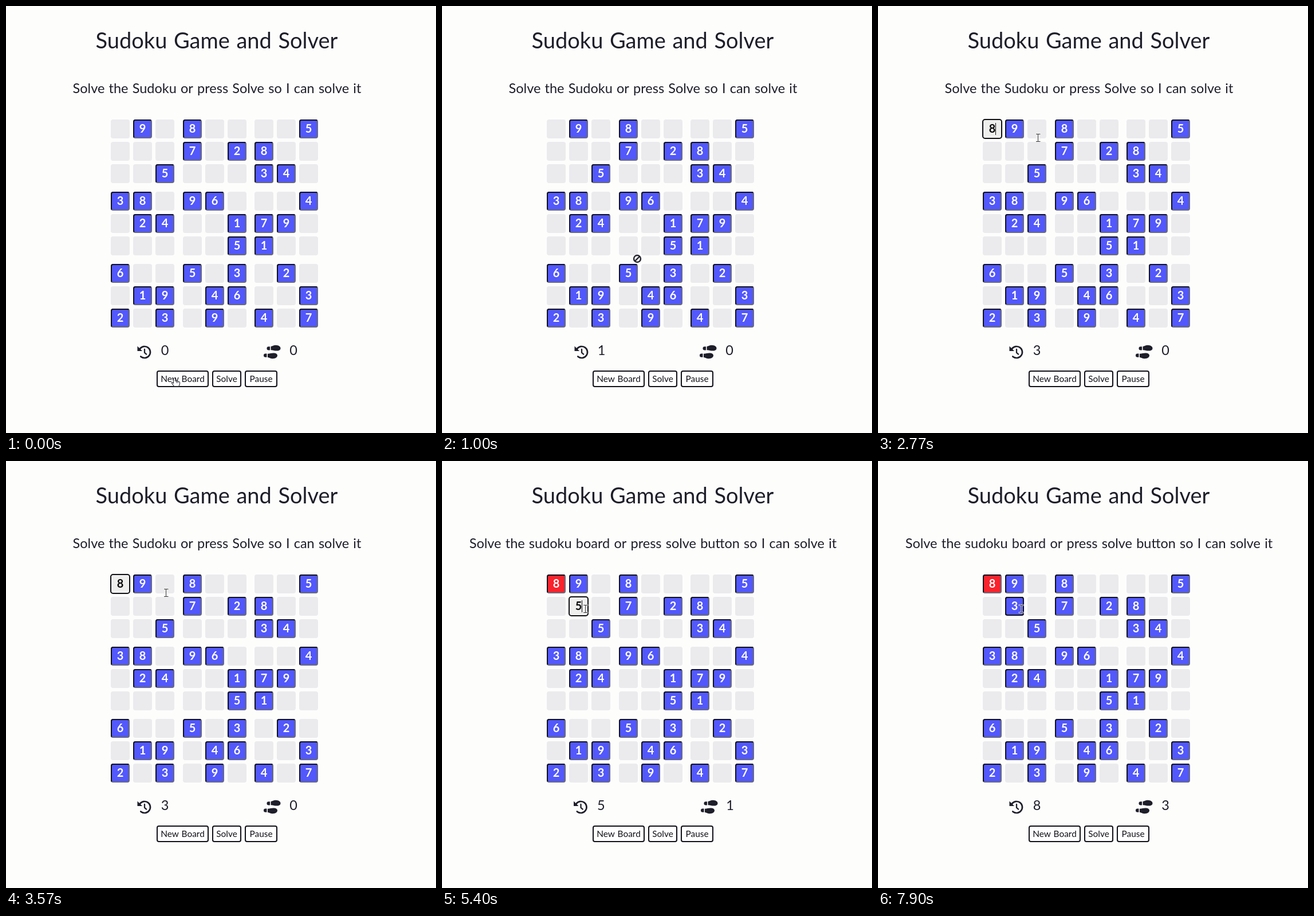
An HTML page with a canvas for the animation above (8000 ms loop, 751 px wide and 745 px high).

```html
<!DOCTYPE html>
<html lang="en">
<head>
<meta charset="utf-8">
<title>Sudoku Game and Solver</title>
<style>
  html, body { margin: 0; width: 100%; height: 100%; overflow: hidden; background: #fdfdfc; }
  canvas { display: block; }
</style>
</head>
<body>
<canvas id="stage" width="751" height="745"></canvas>
<script>
const ctx = document.getElementById('stage').getContext('2d');
const LOOP = 8000;
const INK = '#1e1e2a', BLUE = '#5258fb', RED = '#f9232d', EMPTY = '#ebebee', PAGE = '#fdfdfc';
const BOARD = [
  '.9.8....5', '...7.28..', '..5...34.',
  '38.96...4', '.24..179.', '.....51..',
  '6..5.3.2.', '.19.46..3', '2.3.9.4.7'
];
const INTRO = 'Solve the Sudoku or press Solve so I can solve it';
const PROMPT = 'Solve the sudoku board or press solve button so I can solve it';
const RETRY = 'Try again!';

// Each track lists [start time, value]; the latest started value holds.
const message = [[0, INTRO], [3640, RETRY], [4640, PROMPT], [5940, RETRY], [6960, PROMPT]];
const steps = [[0, 0], [3640, 1], [5940, 2], [7300, 3]];
const focus = [[0, null], [1800, [0, 0]], [3640, null], [4140, [1, 1]]];
const typedA = [[0, ['', EMPTY]], [2600, ['8', EMPTY]], [3640, ['8', RED]]];
const typedB = [[0, ['', EMPTY]], [5150, ['5', EMPTY]], [5940, ['5', RED]],
  [6250, ['', RED]], [6500, ['3', RED]], [7300, ['3', BLUE]]];
const caretOn = [[0, 0], [1800, 1800], [2600, 2600], [4140, 4140], [5150, 5150],
  [5940, 5940], [6500, 6500]];
const cursor = [[0, 'hand'], [520, 'arrow'], [760, 'blocked'], [1450, 'beam']];
const path = [
  [0, 296, 656], [420, 296, 656], [1000, 341, 441], [1150, 335, 420], [1700, 204, 217],
  [2350, 204, 217], [2700, 279, 230], [3650, 279, 230], [4050, 245, 257],
  [4400, 245, 257], [4900, 250, 258], [LOOP, 250, 258]
];

const at = (track, t) => track.filter(([start]) => start <= t).pop()[1];

function pointAt(t) {
  const i = Math.max(1, path.findIndex(p => p[0] > t));
  const [t0, x0, y0] = path[i - 1], [t1, x1, y1] = path[i];
  const u = (t - t0) / (t1 - t0), k = u * u * (3 - 2 * u);
  return [x0 + (x1 - x0) * k, y0 + (y1 - y0) * k];
}

function text(str, x, y, size, color = INK, weight = 400) {
  ctx.font = `${weight} ${size}px Lato, sans-serif`;
  ctx.wordSpacing = size * 0.05 + 'px';
  ctx.textAlign = 'center';
  ctx.fillStyle = color;
  ctx.fillText(str, x, y);
}

function box(x, y, w, h, r, fill, stroke, line = 2) {
  ctx.beginPath();
  ctx.roundRect(x, y, w, h, r);
  if (fill) { ctx.fillStyle = fill; ctx.fill(); }
  if (stroke) { ctx.strokeStyle = stroke; ctx.lineWidth = line; ctx.stroke(); }
}

function polygon(points, fill) {
  ctx.beginPath();
  points.forEach(p => ctx.lineTo(...p));
  ctx.closePath();
  ctx.fillStyle = fill;
  ctx.fill();
}

function line(points, color, width) {
  ctx.beginPath();
  points.forEach(p => ctx.lineTo(...p));
  ctx.strokeStyle = color;
  ctx.lineWidth = width;
  ctx.stroke();
}

const cellPos = (i, gap) => 39 * i + Math.round(gap * Math.floor(i / 3));

function cell(row, col, digit, fill, focused, caret) {
  const x = 183 + cellPos(col, 8.6), y = 198 + cellPos(row, 9), s = 33;
  if (fill === EMPTY) {
    box(x, y, s, s, 4, fill);
    if (focused) box(x, y, s, s, 4, '#efefee', '#101014');
  } else {
    ctx.save();
    box(x, y, s, s, 4, focused ? '#11111c' : '#696a7c');
    ctx.clip();
    polygon([[x, y], [x + s, y], [x + s - 2, y + 2], [x + 2, y + s - 2], [x, y + s]], '#11111c');
    ctx.restore();
    box(x + 2, y + 2, s - 4, s - 4, 2, fill);
  }
  const ink = fill === EMPTY ? '#0b0b0b' : '#fff';
  if (digit) text(digit, x + 16.5, y + 23, 20, ink, 700);
  if (caret) {
    ctx.fillStyle = ink;
    ctx.fillRect(x + (digit ? 22 : 16), y + 6, 1, 21);
  }
}

function drawBoard(t) {
  const here = at(focus, t);
  const entries = { '00': at(typedA, t), '11': at(typedB, t) };
  const blink = (t - at(caretOn, t)) % 1000 < 500;
  for (let r = 0; r < 9; r++) {
    for (let c = 0; c < 9; c++) {
      const given = BOARD[r][c];
      const [digit, fill] = entries[`${r}${c}`] || (given === '.' ? ['', EMPTY] : [given, BLUE]);
      const focused = here && here[0] === r && here[1] === c;
      cell(r, c, digit, fill, focused, focused && blink && fill !== BLUE);
    }
  }
}

// Narrower digits shift the centred icon and number to the right.
const nudge = n => ({ 1: 2, 4: 0.5, 5: 0.5 }[n] || 0);

function historyIcon(x, y) {
  ctx.beginPath();
  ctx.arc(x, y, 10, -2.55, 2.3);
  ctx.strokeStyle = INK;
  ctx.lineWidth = 2.7;
  ctx.lineCap = 'round';
  ctx.stroke();
  polygon([[x - 12.5, y - 10.5], [x - 12.5, y - 2], [x - 4, y - 2]], INK);
  line([[x, y - 5], [x, y + 0.8], [x + 3.2, y + 3.6]], INK, 2.3);
  ctx.lineCap = 'butt';
}

function shoePrint(x, y, flip) {
  ctx.save();
  ctx.translate(x, y);
  ctx.scale(1, flip);
  box(0, -2.8, 5.5, 6.2, [3, 0, 0, 3], INK);
  ctx.beginPath();
  ctx.moveTo(7, -3);
  ctx.bezierCurveTo(10, -3.5, 12, -5.4, 16, -5.2);
  ctx.bezierCurveTo(21, -5, 24, -2.8, 24, 0.2);
  ctx.bezierCurveTo(24, 3.2, 21, 4.6, 17, 4.6);
  ctx.bezierCurveTo(13, 4.6, 11, 3.4, 7, 3.2);
  ctx.closePath();
  ctx.fillStyle = INK;
  ctx.fill();
  ctx.restore();
}

function drawCounters(t) {
  const seconds = Math.floor((t + 400) / 1000), moves = at(steps, t);
  const a = nudge(seconds), b = nudge(moves);
  historyIcon(242 + a, 604);
  text(seconds, 277.5 + a / 2, 609, 23.5);
  shoePrint(455.5 + b, 597, 1);
  shoePrint(450 + b, 610, -1);
  text(moves, 502 + b / 2, 609, 23.5);
}

function button(label, x, w) {
  box(x + 1, 637, w - 2, 27, 3, '#fff', '#111118');
  text(label, x + w / 2, 656, 15.4, '#111118');
}

function beam(x, y) {
  const shape = [[[x - 3, y - 6.5], [x + 4, y - 6.5]], [[x + 0.5, y - 6.5], [x + 0.5, y + 6.5]],
    [[x - 3, y + 6.5], [x + 4, y + 6.5]]];
  ctx.lineCap = 'square';
  shape.forEach(p => line(p, '#ffffffcc', 2.4));
  shape.forEach(p => line(p, '#333', 1));
  ctx.lineCap = 'butt';
}

function blocked(x, y) {
  ctx.beginPath();
  ctx.arc(x, y, 6, 0, Math.PI * 2);
  ctx.fillStyle = '#f4f4f4';
  ctx.fill();
  ctx.strokeStyle = '#25252e';
  ctx.lineWidth = 2.4;
  ctx.stroke();
  line([[x - 4, y + 4], [x + 4, y - 4]], '#25252e', 2.4);
}

function arrow(x, y) {
  const tip = [[0, 0], [0, 15], [3.5, 12], [6, 17], [8, 16], [6, 11], [10.5, 11]]
    .map(([dx, dy]) => [x + dx, y + dy]);
  polygon(tip, '#fff');
  ctx.strokeStyle = '#222';
  ctx.lineWidth = 1;
  ctx.stroke();
}

function hand(x, y) {
  ctx.save();
  ctx.translate(x, y);
  ctx.beginPath();
  ctx.moveTo(-3.5, 2);
  ctx.lineTo(-3.5, -6);
  ctx.quadraticCurveTo(-2, -8.5, -0.5, -6);
  ctx.lineTo(-0.5, -2);
  ctx.lineTo(6, -0.8);
  ctx.quadraticCurveTo(8, 0, 7.5, 3);
  ctx.lineTo(6, 7.5);
  ctx.lineTo(-2.5, 7.5);
  ctx.lineTo(-6.8, 1.5);
  ctx.quadraticCurveTo(-6.5, -0.8, -3.5, 2);
  ctx.closePath();
  ctx.fillStyle = '#fff';
  ctx.fill();
  ctx.strokeStyle = '#33333c';
  ctx.lineWidth = 1.1;
  ctx.stroke();
  [1.8, 4.2].forEach(dx => line([[dx, -1], [dx, 2]], '#33333c', 0.9));
  ctx.restore();
}

const pointers = { hand, arrow, blocked, beam };

function draw(t) {
  ctx.fillStyle = PAGE;
  ctx.fillRect(0, 0, 751, 745);
  text('Sudoku Game and Solver', 368, 74, 38);
  text(at(message, t), 368.5, 151.5, 23.5);
  drawBoard(t);
  drawCounters(t);
  button('New Board', 263, 91);
  button('Solve', 360, 51);
  button('Pause', 417, 57);
  pointers[at(cursor, t)](...pointAt(t).map(Math.round));
}

const start = performance.now();
function tick() {
  draw((performance.now() - start) % LOOP);
  requestAnimationFrame(tick);
}
tick();
</script>
</body>
</html>
```
